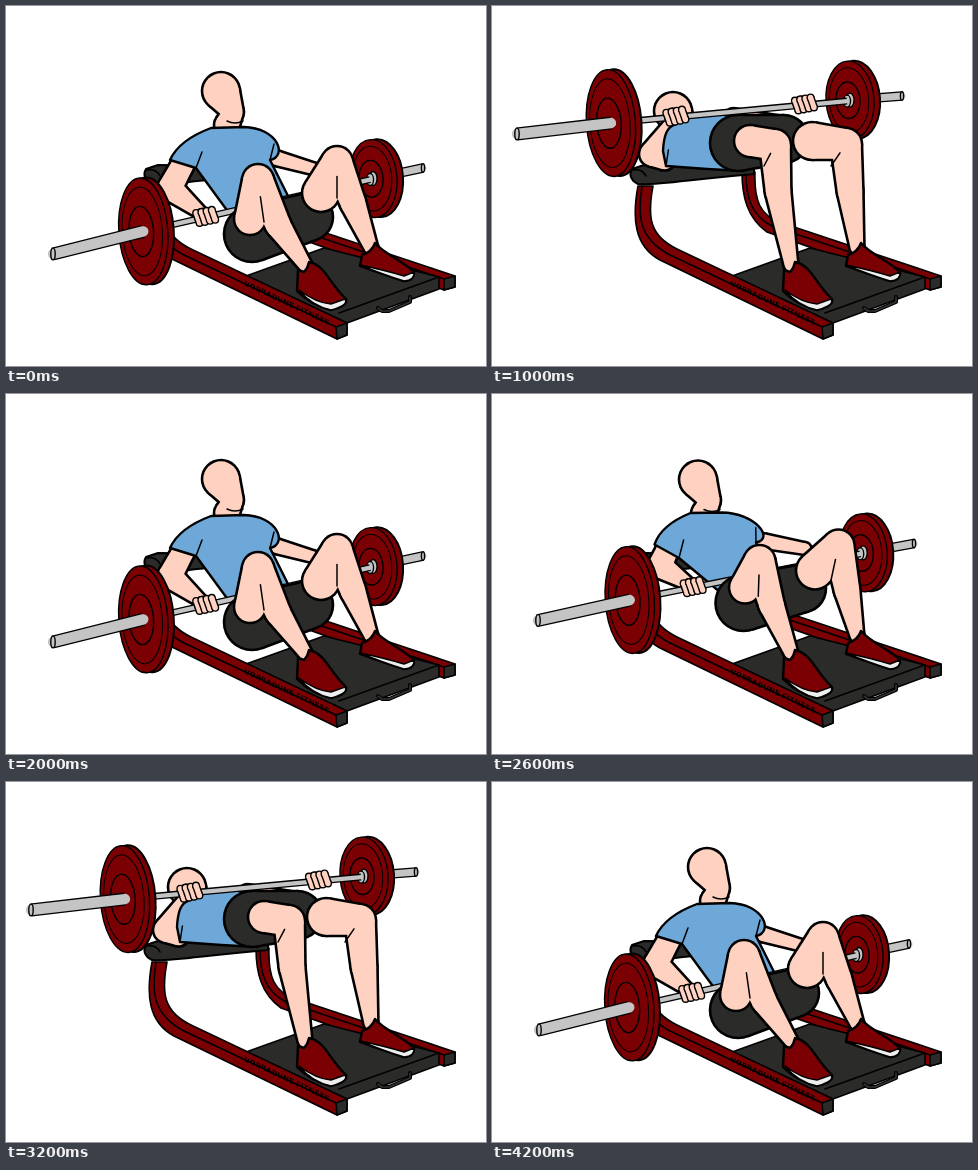
An HTML page for the animation above (4400 ms loop, 480x360 px).

```html
<!DOCTYPE html>
<html lang="en">
<head>
<meta charset="utf-8">
<title>Hip thrust</title>
<style>
html, body { margin: 0; width: 100%; height: 100%; overflow: hidden; background: #fff; }
svg { display: block; width: 480px; height: 360px; }
.pose { visibility: hidden; }
.pose.on { visibility: visible; }
.red { fill: #7a0003; }
.dark { fill: #2b2b29; }
.sole { fill: #eee; }
text { font: italic bold 7.5px Inter, "Liberation Sans", sans-serif; }
</style>
</head>
<body>
<svg viewBox="0 0 480 360" stroke="#000" stroke-width="1.6" stroke-linejoin="round" stroke-linecap="round" fill="none">
  <g id="bench">
    <path class="red" d="M250,166C250,190 255,212 275,226L438,284L449,281V270L290,217C268,210 262,195 263,166Z"/>
    <path d="M254,168C254,192 260,210 280,220L438,273"/>
    <path class="dark" d="M438,273L449,270V281L438,284Z"/>
    <path class="dark" d="M240,270L318,242L433,271V283L341,317Z"/>
    <path d="M333,307L433,271"/>
    <path d="M372,302L376,305H383L404,296V291" stroke-width="4"/>
    <path d="M372,302L376,305H383L404,296V291" stroke="#333" stroke-width="1.6"/>
    <path class="red" d="M146,180C140,212 142,240 168,254L331,333L341,329V317L185,243C158,230 155,212 161,180Z"/>
    <path d="M150,180C145,212 148,232 176,248L330,321"/>
    <path class="dark" d="M330,321L341,317V329L331,333Z"/>
    <text transform="matrix(.92 .434 0 1 238.5 279.5)" textLength="92" fill="#000" stroke="none">VORRADUNE FITNESS</text>
    <path class="dark" d="M140,163L152,159L262,160V168C200,173 162,180 146,178C138,174 137,168 140,163Z" stroke-width="2"/>
    <path d="M140,164Q150,162 154,170"/>
  </g>
  <g id="poses"></g>
  <g id="shoes" stroke-width="2.4">
    <path class="red" d="M356,249Q366,246 369,237C378,248 396,254 408,266Q409,274 398,275Q378,269 354,260Z"/>
    <path class="sole" stroke-width="1.4" d="M354,259Q378,264 398,270L408,266Q409,274 398,275Q378,269 354,259Z"/>
    <path class="red" d="M292,264L298,266Q302,262 303,256C320,260 322,276 340,293Q342,300 325,304Q306,300 291,285Z"/>
    <path class="sole" stroke-width="1.4" d="M293,284Q310,297 325,298L339,293Q343,299 325,304Q306,300 293,284Z"/>
  </g>
</svg>
<script>
const SKIN = '#fed1c0', RED = '#7a0003', GREY = '#c4c4c4', BLUE = '#6ea8d9', DARK = '#2b2b29';

// Joint positions at the low, middle and high pose.
const joints = {
  tip: [[47, 248], [45, 205], [25, 128]],
  end: [[417, 162], [427, 137], [410, 90]],
  skull: [[215, 85], [197, 86], [181, 105]],
  elbow: [[164, 182], [172, 162], [160, 148]],
  farWrist: [[308, 163], [318, 146], [300, 118]],
  seat: [[246, 228], [257, 190], [246, 137]],
  hip: [[303, 211], [317, 178], [292, 133]],
  thigh: [[244, 213], [262, 174], [258, 135]],
  knee: [[252, 174], [283, 160], [283, 139]],
  calf: [[272, 219], [287, 203], [286, 185]],
  farThigh: [[315, 187], [331, 166], [320, 135]],
  farKnee: [[331, 156], [362, 147], [354, 138]],
  farCalf: [[347, 197], [363, 195], [358, 185]],
  collarL: [[205, 122], [192, 116], [180, 120]],
  collarR: [[238, 121], [222, 116], [205, 108]],
  shoulder: [[272, 122], [255, 116], [225, 107]],
  sleeve: [[282, 150], [284, 140], [242, 107]],
  farPit: [[264, 154], [264, 143], [240, 112]],
  hemR: [[283, 192], [268, 152], [252, 165]],
  hemL: [[223, 207], [228, 185], [215, 163]],
  armpit: [[190, 162], [184, 166], [174, 160]],
  cuff: [[164, 154], [161, 147], [171, 145]],
  nearShoulder: [[173, 134], [165, 128], [172, 124]]
};
const ankle = [299, 259], farAnkle = [365, 242];

const mix = (a, b, k) => a.map((v, i) => v + (b[i] - v) * k);
const add = (a, x, y) => [a[0] + x, a[1] + y];

// Chain of [point, radius] circles joined by their outer tangents.
function chain(links, grow) {
  let out = '';
  links.forEach(([p, radius], i) => {
    const r = radius + grow;
    out += `<circle cx="${p[0]}" cy="${p[1]}" r="${r}"/>`;
    if (!i) return;
    const [q, prev] = links[i - 1], s = prev + grow;
    const dx = p[0] - q[0], dy = p[1] - q[1], dist = Math.hypot(dx, dy);
    if (dist <= Math.abs(r - s)) return;
    const dir = Math.atan2(dy, dx), spread = Math.acos((s - r) / dist);
    const rim = (c, rad, side) => add(c, rad * Math.cos(dir + side * spread), rad * Math.sin(dir + side * spread));
    out += `<path d="M${rim(q, s, 1)}L${rim(p, r, 1)}L${rim(p, r, -1)}L${rim(q, s, -1)}Z"/>`;
  });
  return out;
}

const limb = (links, fill, weight = 1.3) =>
  `<g stroke="none"><g fill="#000">${chain(links, weight)}</g><g fill="${fill}">${chain(links, -weight)}</g></g>`;
const line = (...pts) => `<path d="M${pts.join('L')}" stroke-width="1.5"/>`;
const oval = ([x, y], rx, ry, fill, width = 1.4) =>
  `<ellipse cx="${x}" cy="${y}" rx="${rx}" ry="${ry}" fill="${fill}" stroke-width="${width}"/>`;

function rod(a, b, width) {
  const d = `M${a}L${b}`;
  return `<path d="${d}" stroke-width="${width}" stroke-linecap="butt"/>` +
    `<path d="${d}" stroke="${GREY}" stroke-width="${width - 2.6}"/>`;
}

function plate(c, rx, ry) {
  return `<g transform="rotate(-4 ${c})">` + oval(add(c, 6, 0), rx, ry, RED, 2) + oval(c, rx, ry, RED) +
    oval(add(c, -1, 0), rx * .82, ry * .83, 'none', 1) + oval(add(c, -2, 0), rx * .5, ry * .47, 'none') + '</g>';
}

function hand(c) {
  let out = limb([[add(c, -3, 0), 8]], SKIN, .8);
  for (let i = 0; i < 4; i++) {
    const x = (i - 1.5) * 5.2;
    out += limb([[add(c, x - 1.5, -5 - x * .2), 3.3], [add(c, x + 2, 5 - x * .2), 3.3]], SKIN, .7);
  }
  return out;
}

function leg(thigh, knee, calf, foot, thighR) {
  const back = mix(thigh, calf, .5);
  return limb([[thigh, thighR], [knee, 16], [calf, 13.5], [foot, 7.5]], SKIN) + line(back, mix(back, knee, .6));
}

function shirt(p) {
  const d = `M${p.collarL}L${p.collarR}C${p.shoulder} ${p.sleeve} ${p.farPit}L${p.hemR}L${p.hemL}` +
    `L${p.armpit}L${p.cuff}Q${p.nearShoulder} ${p.collarL}Z`;
  return `<path d="${d}" fill="${BLUE}" stroke-width="2.4"/>` +
    line(p.armpit, mix(p.armpit, p.collarL, .4)) + line(p.farPit, mix(p.farPit, p.shoulder, .5));
}

function drawPose(p, high) {
  const onBar = k => add(mix(p.tip, p.end, k), 0, -9 * k * (1 - k));
  const near = onBar(.244), far = onBar(.865), grip = onBar(.412);
  const hub = add(far, -3, 1), jaw = add(p.skull, 12, 21);
  const bar = rod(near, hub, 7);
  return [
    rod(far, p.end, 9.5), oval(p.end, 1.6, 4.2, GREY),
    plate(far, 24, 39),
    oval(add(hub, 3, -1), 4, 7, GREY), oval(hub, 3.5, 6, GREY),
    limb([[mix(p.sleeve, p.farPit, .6), 8], [p.farWrist, 6.5]], SKIN),
    limb([[p.skull, 19], [jaw, 11], [add(p.skull, 6, 34), 13]], SKIN),
    `<path d="M${add(jaw, -6, 9)}q8,4 16,0" stroke-width="1.5"/>`,
    limb([[mix(p.armpit, p.cuff, .5), 12], [p.elbow, 13], [grip, 6]], SKIN),
    shirt(p),
    high ? '' : bar,
    limb([[p.seat, 28], [p.hip, 24]], DARK),
    leg(p.farThigh, p.farKnee, p.farCalf, farAnkle, 19),
    leg(p.thigh, p.knee, p.calf, ankle, 16),
    high ? bar + hand(onBar(.746)) : '',
    hand(grip),
    plate(near, 24.5, 53.5), rod(p.tip, near, 13), oval(p.tip, 2.2, 5.9, GREY)
  ].join('');
}

function poseAt(t) {
  const i = Math.min(1, Math.floor(t)), pose = {};
  for (const name in joints) pose[name] = mix(joints[name][i], joints[name][i + 1], t - i);
  return pose;
}

document.getElementById('poses').innerHTML =
  [0, .5, 1, 1.5, 2].map(t => `<g class="pose">${drawPose(poseAt(t), t === 2)}</g>`).join('');

const order = 'AABCDEEDCBAAABCDEEDCBA', stepMs = 200;
const poses = document.querySelectorAll('.pose');
const start = performance.now();

function tick() {
  const step = Math.floor((performance.now() - start) / stepMs) % order.length;
  poses.forEach((g, i) => g.classList.toggle('on', 'ABCDE'[i] === order[step]));
  requestAnimationFrame(tick);
}
tick();
</script>
</body>
</html>
```
